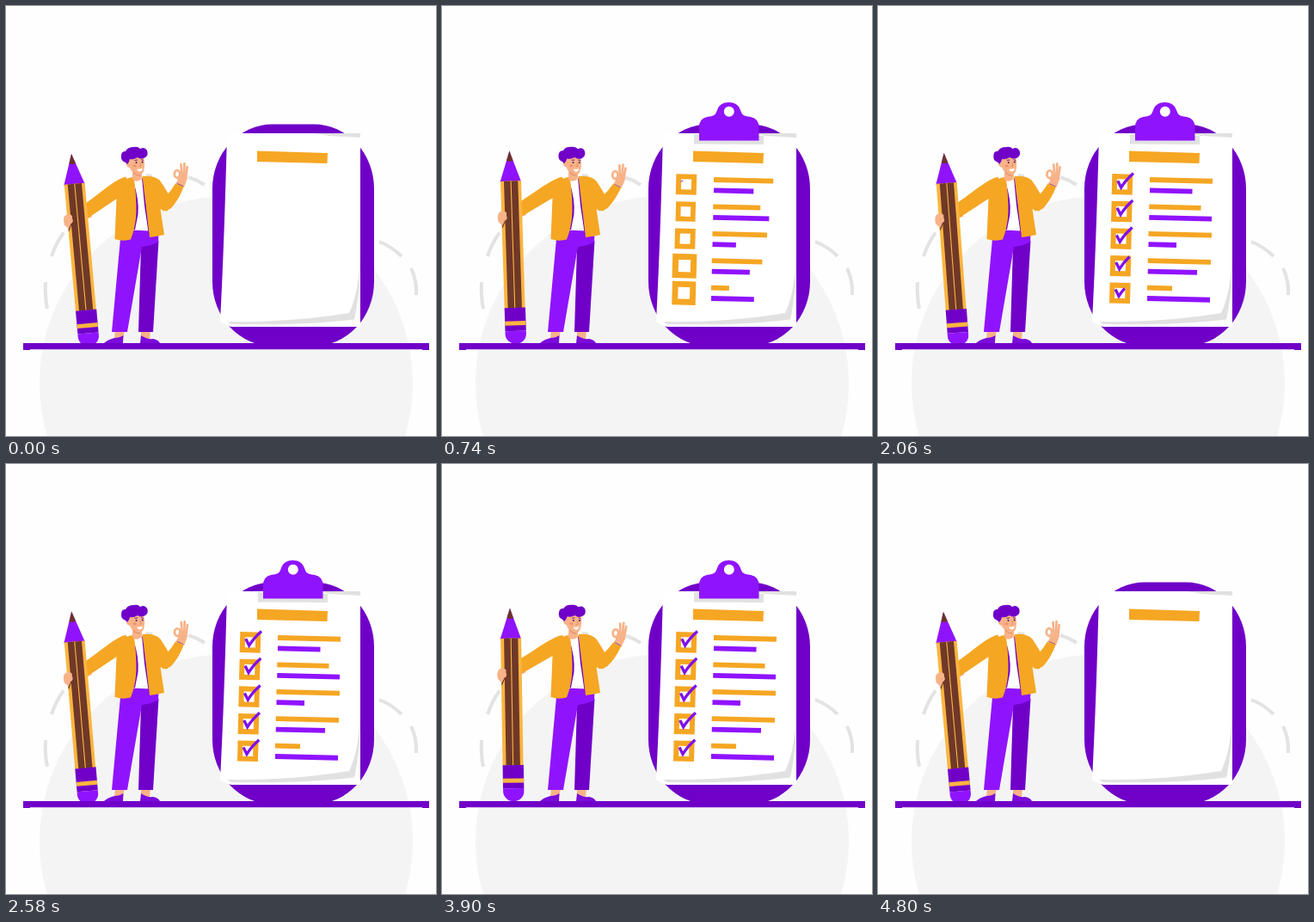
Animation of 500 by 500 pixels, one loop 4840 ms. Source, as an HTML page:

```html
<!DOCTYPE html>
<html lang="en">
<head>
<meta charset="utf-8">
<title>Checklist</title>
<style>
  html, body { margin: 0; width: 100%; height: 100%; overflow: hidden; background: #fefefe; }
  svg { display: block; width: 100vw; height: 100vh; }
  .deep { fill: #7000c8; }
  .vivid { fill: #9013fe; }
  .gold { fill: #f5a623; }
  .skin { fill: #f8b288; }
  .white { fill: #fff; }
  .grey { fill: #e1e1e1; }
  .dash { fill: none; stroke: #e3e3e3; stroke-width: 4; }
  .finger { fill: none; stroke: #f8b288; stroke-width: 2.7; stroke-linecap: round; stroke-linejoin: round; }
  .check { fill: none; stroke: #8010e8; stroke-width: 3.3; }
</style>
</head>
<body>
<svg viewBox="0 0 500 500" xmlns="http://www.w3.org/2000/svg">
  <circle cx="256" cy="438.500" r="217" fill="#f4f4f4"/>
  <path class="dash" d="M67 263.500Q58 276 53 291M46 321Q45 337 48 352M163 197L170 198M212 199Q222 202 231 208M434 274Q449 280 460 291M471 305Q478 319 477 336"/>

  <!-- board and sheets -->
  <rect class="deep" x="240" y="137.500" width="188" height="258" rx="70" ry="75"/>
  <path class="white" d="M257 148H412V373H262Q254 371 249 367Q254 270 257 148Z"/>
  <path class="grey" d="M360 148H412V153L376 151Z"/>
  <path class="grey" d="M412 290C411 320 406 343 399 357C355 364 305 368 257 367L262 370C315 371 360 370 405 364.500Q411 340 412 290Z"/>
  <path class="gold" d="M292 168.500L374 171L373.500 183L292 181Z"/>
  <g id="clip">
    <path class="grey" d="M293 149H368V151H374V161L293 160.500Z"/>
    <path class="vivid" d="M299 156.500V141Q299 131 308 129C318 128 318 126 320 121C322 115 327 112 333.500 112C340 112 345 115 347 121C349 126 349 128 359 129Q368.500 131 368.500 141V156.500Z"/>
    <circle class="white" cx="333.800" cy="122.700" r="6"/>
  </g>
  <g id="rows"></g>

  <!-- legs -->
  <path class="skin" d="M127 377H138L136 387H126ZM157 377H168L167 388H157Z"/>
  <path class="deep" d="M157 280L177.500 273L171 379H154Z"/>
  <path class="vivid" d="M134 260L177.500 262L177 274.500Q168 279 158 280L141 379H123Z"/>
  <path fill="#7a0cdc" d="M114 392Q118 388 126 386Q132 386 136.500 383L136 392ZM156 392L157 383Q164 388 171 387Q177 388 179 392Z"/>

  <!-- arm with pencil -->
  <g id="arm">
    <path class="skin" d="M67 238L95 229L97 242L72 250Z"/>
    <path class="gold" d="M140 199C128 201 111 214 91 226L92.500 243L132 221L147 210Z"/>
    <g transform="rotate(-.25 80 280)">
      <path class="vivid" d="M80 167L92.500 203H68Z"/>
      <path fill="#6b3426" d="M80 167L83.800 178.500Q80 180 76.300 178Z"/>
      <rect x="68.500" y="202" width="24" height="148" fill="#fbb540"/>
      <rect x="72.500" y="202" width="16.300" height="148" fill="#6f3828"/>
      <path d="M80.600 202V350" stroke="#fbb540" stroke-width="1.100"/>
      <rect class="deep" x="68.500" y="349.500" width="24.300" height="27"/>
      <rect x="68.500" y="365" width="24.300" height="5" fill="#fbb540"/>
      <path class="vivid" d="M68.500 376.500H92.800V380A12.150 11.500 0 0 1 68.500 380Z"/>
    </g>
    <path fill="#6b3426" d="M68 248L74 246L69 257Z"/>
    <path class="skin" d="M65 239Q68 235.500 73 237.500Q75 239 74 242Q76 246 72 248L69 254Q66 250 64.500 249Q63 243 65 239Z"/>
  </g>

  <!-- torso -->
  <path class="white" d="M147 202H160L165 257L148 260Z"/>
  <path class="deep" d="M148 204Q155 225 153.500 242L150 260H145ZM158 200L161 232L166 266L172 262L164 206Z"/>
  <path class="gold" d="M148.500 198.500Q136 200 129 212L126.500 271Q136 274 145 271.500Q151 256 151.500 240Q152 221 148.500 198.500Z"/>
  <path class="gold" d="M158.500 198Q173 197 179 203Q186 213 190 221L188 238Q184 239 179.500 236L184 266Q176 268 167 269Q163 235 158.500 198Z"/>

  <g id="hand">
    <path class="skin" d="M197 207L207 211L211 200L207 194L202 199Z"/>
    <ellipse class="finger" cx="199" cy="195.500" rx="3.200" ry="4.300"/>
    <path class="finger" d="M204.500 197L203.500 184M207 198L207.500 183M209.300 199L210.700 187M200 200L203 205"/>
    <path d="M199 206.500L206 209.500" stroke="#8f5a86" stroke-width="1"/>
    <path class="gold" d="M186 221Q192 215 197 206.500L206.500 210.500Q201 225 193 234Q188 239 182 238Z"/>
  </g>

  <g id="head">
    <path class="skin" d="M147 190H158V201Q152 206 147 202Z"/>
    <path class="skin" d="M142 177Q150 171 160 176Q162 186 160 192Q158 197 153 196Q146 194 144 188Q139 187 140 182Z"/>
    <path d="M148 193Q151 197 156 197" fill="none" stroke="#df8d68" stroke-width="1"/>
    <path class="deep" d="M139 182Q133 180 134 174Q134 169 139 169Q141 164 149 164Q153 163 156 166Q161 163 164 168Q166 173 162 176Q157 179 153 176Q148 179 144 178Q143 182 141 184Z"/>
    <g fill="#43205c">
      <circle cx="151.500" cy="182" r="1"/>
      <circle cx="158.600" cy="181.500" r="1"/>
    </g>
    <path d="M149.500 179.500L153 179M157 178.700L160 179.300" stroke="#5b167f" stroke-width=".9"/>
    <path d="M156 182L157 186L155 186.500" fill="none" stroke="#df8d68" stroke-width=".9"/>
    <ellipse cx="149.500" cy="186" rx="2" ry="1.300" fill="#f08d70"/>
    <path class="white" d="M152 189.500Q156 190 159 188.500Q158 192.500 155.500 192.500Q153 192 152 189.500Z"/>
  </g>

  <path class="deep" d="M20 392H492V400H484V399.300H28V400H20Z"/>
</svg>
<script>
const LOOP = 4840, CUT = 4800, SWAY = 2400;
const $ = id => document.getElementById(id);
const clamp = v => Math.max(0, Math.min(1, v));
const sine = p => (1 - Math.cos(Math.PI * p)) / 2;
const easeOut = p => 1 - (1 - p) ** 3;

function add(parent, tag, attrs) {
  const el = document.createElementNS("http://www.w3.org/2000/svg", tag);
  for (const key in attrs) el.setAttribute(key, attrs[key]);
  return parent.appendChild(el);
}

// right ends of the two lines in each row
const ends = [[389, 365.5], [375.5, 388], [388, 347], [387, 371], [342, 386]];
const rows = ends.map((pair, i) => {
  const x = 284 - i * 0.68, y = 207.4 + i * 31.6;
  const box = add($("rows"), "rect", {
    x: -9, y: -9, width: 18, height: 18, fill: "#fff", stroke: "#f5a623", "stroke-width": 6
  });
  const lines = pair.map((end, j) => {
    const left = 316 - i * 0.75, top = 202 + i * 31.4 + j * 12.4;
    const el = add($("rows"), "line", {
      x1: left, y1: top, stroke: j ? "#9013fe" : "#f5a623", "stroke-width": 5.8
    });
    return { el, left, top, width: end - left };
  });
  const check = add($("rows"), "path", {
    class: "check", pathLength: 1,
    d: `M${x - 5.2} ${y - 4.2}L${x - 1.3} ${y + 3.6}Q${x + 4} ${y - 5} ${x + 13} ${y - 13}`
  });
  return { x, y, box, lines, check };
});

function spring(ms) {
  return ms <= 0 ? 0 : 1 - Math.exp(-ms * 0.008) * Math.cos(Math.PI * ms / 200);
}

function turn(id, deg, x, y) {
  $(id).setAttribute("transform", `rotate(${deg} ${x} ${y})`);
}

function scaleAt(el, x, y, s, extra = "") {
  el.setAttribute("transform", `translate(${x} ${y}) ${extra} scale(${s})`);
  el.style.display = s > 0.001 ? "" : "none";
}

function drawRow(row, i, t) {
  scaleAt(row.box, row.x, row.y, spring(t - 255 - i * 90), "rotate(1.5)");
  row.lines.forEach((line, j) => {
    const p = easeOut(clamp((t - 340 - i * 45 - j * 18) / 640));
    line.el.setAttribute("x2", line.left + line.width * p);
    line.el.setAttribute("y2", line.top + line.width * p * 0.024);
    line.el.style.display = p > 0 ? "" : "none";
  });
  const p = clamp((t - 700 - i * 200) / 900);
  const drawn = (p + sine(p)) / 2;
  row.check.setAttribute("stroke-dasharray", `${drawn} 2`);
  row.check.style.display = p > 0 ? "" : "none";
}

function draw(now) {
  let t = now % LOOP;
  if (t >= CUT) t = 0;
  const sway = sine(t / SWAY * 2);
  turn("arm", -4.9 * (1 - sway), 135, 210);
  turn("head", 5.5 * sway, 153, 198);
  turn("hand", 5.2 * sway, 185, 233);

  const s = easeOut(clamp(t / 400));
  scaleAt($("clip"), 334, 156, s, "");
  $("clip").setAttribute("transform", `translate(334 156) scale(${s}) translate(-334 -156)`);
  rows.forEach((row, i) => drawRow(row, i, t));
}

function tick() {
  draw(performance.now());
  requestAnimationFrame(tick);
}
tick();
</script>
</body>
</html>
```
